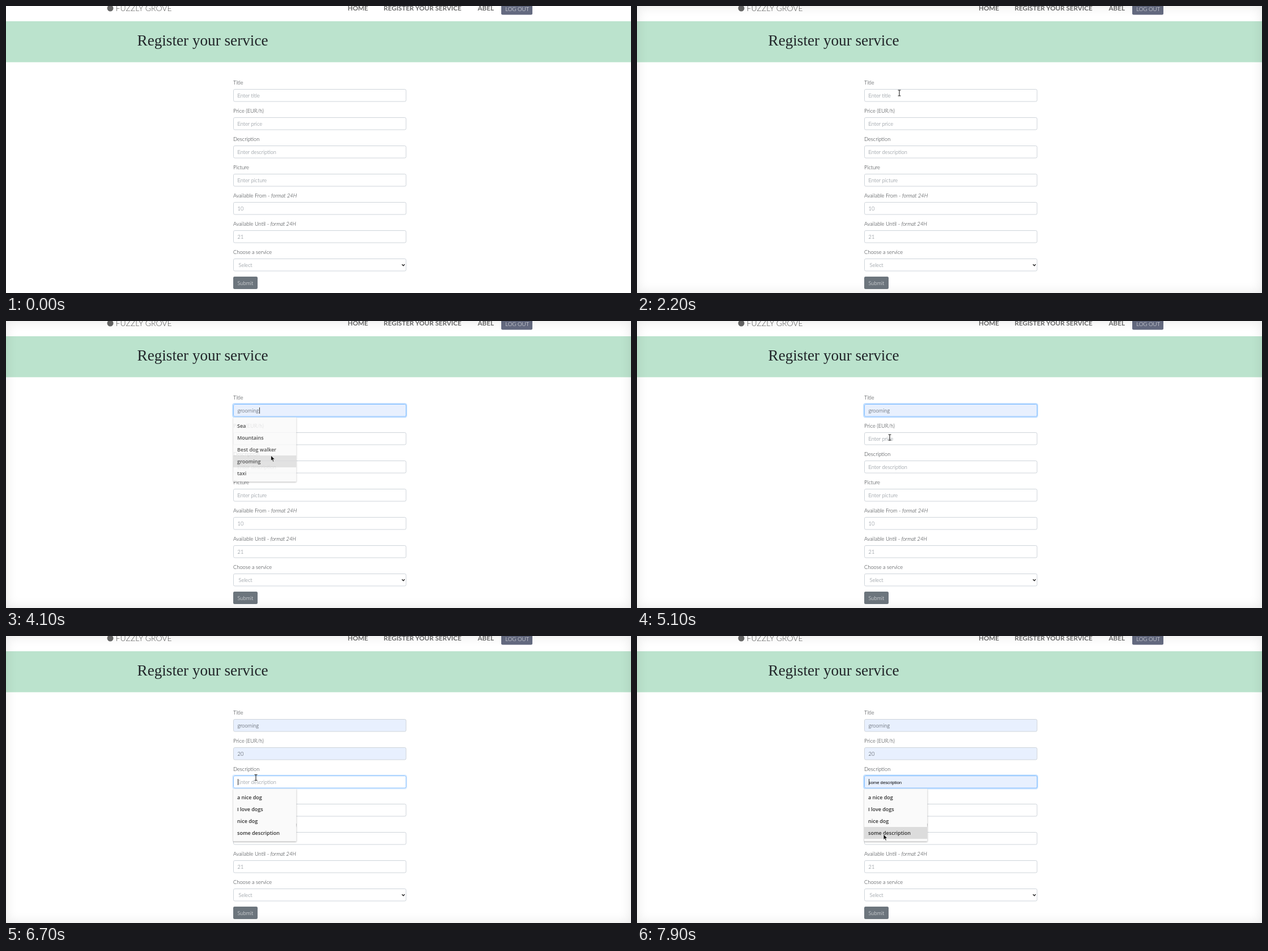
An HTML page for the animation above (8000 ms loop, 1103 by 508 pixels).

```html
<!DOCTYPE html>
<html lang="en">
<head>
<meta charset="utf-8">
<title>Register your service</title>
<style>
  html, body { margin: 0; width: 100%; height: 100%; overflow: hidden; background: #fff; }
  svg { position: absolute; left: 0; top: 0; }
  text { font: 300 9.3px Lato, sans-serif; fill: #212529; white-space: pre; }
  .brand { font-size: 14px; fill: #555; }
  .nav { font-weight: 700; font-size: 11.62px; fill: #6a6a6a; }
  .title { font: 27.2px "Liberation Serif", serif; }
  .button { fill: #fff; }
  .hint { fill: #6c757d; }
  .value { fill: #33383d; }
  .preview { font: 7.75px "Liberation Sans", sans-serif; fill: #000; }
  .option { font: 600 9px "Open Sans", sans-serif; fill: #2e2e2e; }
  .menu { filter: drop-shadow(0 1px 1.2px rgba(0, 0, 0, .35)); }
  #edge {
    position: absolute; left: 0; top: 0; width: 1103px; height: 508px;
    box-shadow: inset 0 0 20px rgba(0, 0, 0, .1);
  }
</style>
</head>
<body>
<svg width="1103" height="508" viewBox="0 0 1103 508">
  <circle cx="184" cy="4" r="5.5" fill="#666"/>
  <text class="brand" x="193.5" y="9">FUZZLY GROVE</text>
  <text class="nav" x="603" y="8">HOME</text>
  <text class="nav" x="666.5" y="8">REGISTER YOUR SERVICE</text>
  <text class="nav" x="832.5" y="8">ABEL</text>
  <rect x="874" y="-8" width="55" height="23.5" rx="2.3" fill="#646a80"/>
  <text class="button" x="881.3" y="8.5" style="font-size:9.6px">LOG OUT</text>
  <rect y="27" width="1103" height="72.5" fill="#bbe3cd"/>
  <text class="title" x="231.5" y="69.5">Register your service</text>
  <g id="form"></g>
  <rect x="401" y="479" width="43" height="22" rx="2.3" fill="#6c757d"/>
  <text class="button" x="408.5" y="493.5">Submit</text>
  <path d="M698.8 457.3l2.4 2.4 2.4-2.4" fill="none" stroke="#222" stroke-width="1.4"/>
  <g id="live"></g>
</svg>
<div id="edge"></div>
<script>
const LOOP = 8000, STEP = 100, BLINK = 600, PITCH = 50, ROW = 21;
const form = document.getElementById('form');
const live = document.getElementById('live');
const edge = document.getElementById('edge');
const ruler = document.createElement('canvas').getContext('2d');

const hours = '<tspan font-style="italic">format 24H</tspan>';
const fields = [
  { label: 'Title', hint: 'Enter title', value: 'grooming',
    focus: 2300, blur: 5400, open: 2300, pick: 4100,
    options: ['Sea', 'Mountains', 'Best dog walker', 'grooming', 'taxi'] },
  { label: 'Price (EUR/h)', hint: 'Enter price', value: '20',
    focus: 5400, blur: 6700, open: 5500, pick: 6200,
    options: ['20'] },
  { label: 'Description', hint: 'Enter description', value: '',
    focus: 6700, blur: LOOP, open: 6700, pick: LOOP,
    options: ['a nice dog', 'I love dogs', 'nice dog', 'some description'] },
  { label: 'Picture', hint: 'Enter picture' },
  { label: 'Available From - ' + hours, hint: '10' },
  { label: 'Available Until - ' + hours, hint: '21' },
  { label: 'Choose a service', hint: 'Select', indent: 2 }
];

// Pointer path: time, x, y
const path = [
  [900, 30, 357], [1200, 240, 275], [1500, 417, 189], [1700, 455.5, 158],
  [1800, 459.5, 154], [2200, 463, 154], [2900, 501.5, 153], [3400, 501.5, 153],
  [3500, 474, 228], [3600, 467.5, 238], [4100, 467.5, 238], [4900, 446, 206],
  [5100, 446, 206], [5600, 443, 210], [5900, 445, 222], [6000, 446, 229],
  [6200, 447, 234], [6500, 441, 250.5], [6700, 441, 250.5], [7500, 453, 344],
  [7600, 443, 348], [7700, 435, 351], [LOOP, 435, 351]
];

const text = (cls, x, y, str) => `<text class="${cls}" x="${x}" y="${y}">${str}</text>`;

function pointerAt(t) {
  if (t < path[0][0]) return null;
  const i = path.findIndex(p => p[0] > t);
  const [a, b] = [path[i - 1], path[i]];
  const k = (t - a[0]) / (b[0] - a[0]);
  return { x: a[1] + (b[1] - a[1]) * k, y: a[2] + (b[2] - a[2]) * k };
}

function drawField(f, i, state) {
  const top = 147 + PITCH * i;
  const { ring = 0, preview = '', value = '' } = state;
  const content = preview ? text('preview', 408.5, top + 15.3, preview)
    : value ? text('value', 408.5, top + 15, value)
    : text('hint', 408.5 + (f.indent || 0), top + 15, f.hint);
  const halo = ring ? `<rect x="400.1" y="${top - .9}" width="306.8" height="24.3" rx="3.2"
    fill="none" stroke="#007bff" stroke-opacity="${.25 * ring}" stroke-width="1.9"/>` : '';
  return text('', 401, top - 8, f.label) + halo +
    `<rect x="401.5" y="${top + .5}" width="304.5" height="21.5" rx="2.3"
      fill="${preview || value ? '#e8f0fe' : '#fff'}" stroke="${ring ? '#80bdff' : '#ced4da'}"/>` +
    content;
}

function drawMenu(f, i, hover, opacity) {
  const top = 175 + PITCH * i;
  const rows = f.options.map((o, n) =>
    (n === hover ? `<rect x="401" y="${top + ROW * n}" width="111.5" height="${ROW}" fill="#dcdcdc"/>` : '') +
    text('option', 408, top + ROW * n + 14, o)).join('');
  return `<g opacity="${opacity}"><rect class="menu" x="401" y="${top - 4.5}" width="111.5"
    height="${ROW * f.options.length + 9}" rx="1" fill="#fafafa"/>${rows}</g>`;
}

function drawCaret(f, i, t, value) {
  const start = t >= f.pick ? f.pick : f.focus;
  if (Math.floor((t - start) / BLINK) % 2) return '';
  ruler.font = '300 9.3px Lato, sans-serif';
  const x = Math.round(409 + (value ? ruler.measureText(value).width : 0));
  return `<rect x="${x}" y="${153 + PITCH * i}" width="1" height="11" fill="#333"/>`;
}

function drawPointer(p, overMenu) {
  const local = (p.y - 147) % PITCH;
  const beam = !overMenu && p.x > 401 && p.x < 706 && local >= 0 && local < 22.5;
  const shape = beam
    ? `<path d="M-2.5-5h2l.5.6.5-.6h2M-2.5 5h2l.5-.6.5.6h2M0-4.5v9" fill="none"
        stroke="#222" stroke-width="1.1"/>`
    : `<path d="M0 0v9.6l2.2-2 1.5 3.6 1.7-.7-1.5-3.5h3.1z" fill="#111"
        stroke="#fff" stroke-width=".7"/>`;
  return `<g transform="translate(${p.x} ${p.y})">${shape}</g>`;
}

function render(t) {
  const p = pointerAt(t);
  let boxes = '', menu = '', caret = '', overMenu = false;
  fields.slice(0, 3).forEach((f, i) => {
    const focused = t >= f.focus && t < f.blur;
    const open = t >= f.open && t < f.pick;
    const closing = t >= f.pick && t < f.pick + STEP;
    const row = p ? Math.floor((p.y - 175 - PITCH * i) / ROW) : -1;
    const hover = (open || closing) && f.options[row] ? row : -1;
    const value = t >= f.pick ? f.value : '';
    const preview = open && hover >= 0 ? f.options[hover] : '';
    const ring = focused ? (t < f.focus + STEP ? .6 : 1) : 0;
    boxes += drawField(f, i, { ring, preview, value });
    if (open || closing) menu = drawMenu(f, i, hover, closing ? .82 : 1);
    if (focused) caret = drawCaret(f, i, t, value);
    overMenu = overMenu || hover >= 0;
  });
  live.innerHTML = boxes + lower + menu + caret + (p ? drawPointer(p, overMenu) : '');
  edge.style.visibility = t < STEP ? 'hidden' : 'visible';
}

// The lower fields sit under the menus but never change.
const lower = '';
form.innerHTML = fields.map((f, i) => i > 2 ? drawField(f, i, {}) : '').join('');

let last = -1;
function tick() {
  const t = Math.floor(performance.now() % LOOP / STEP) * STEP;
  if (t !== last) render(last = t);
  requestAnimationFrame(tick);
}
tick();
</script>
</body>
</html>
```
